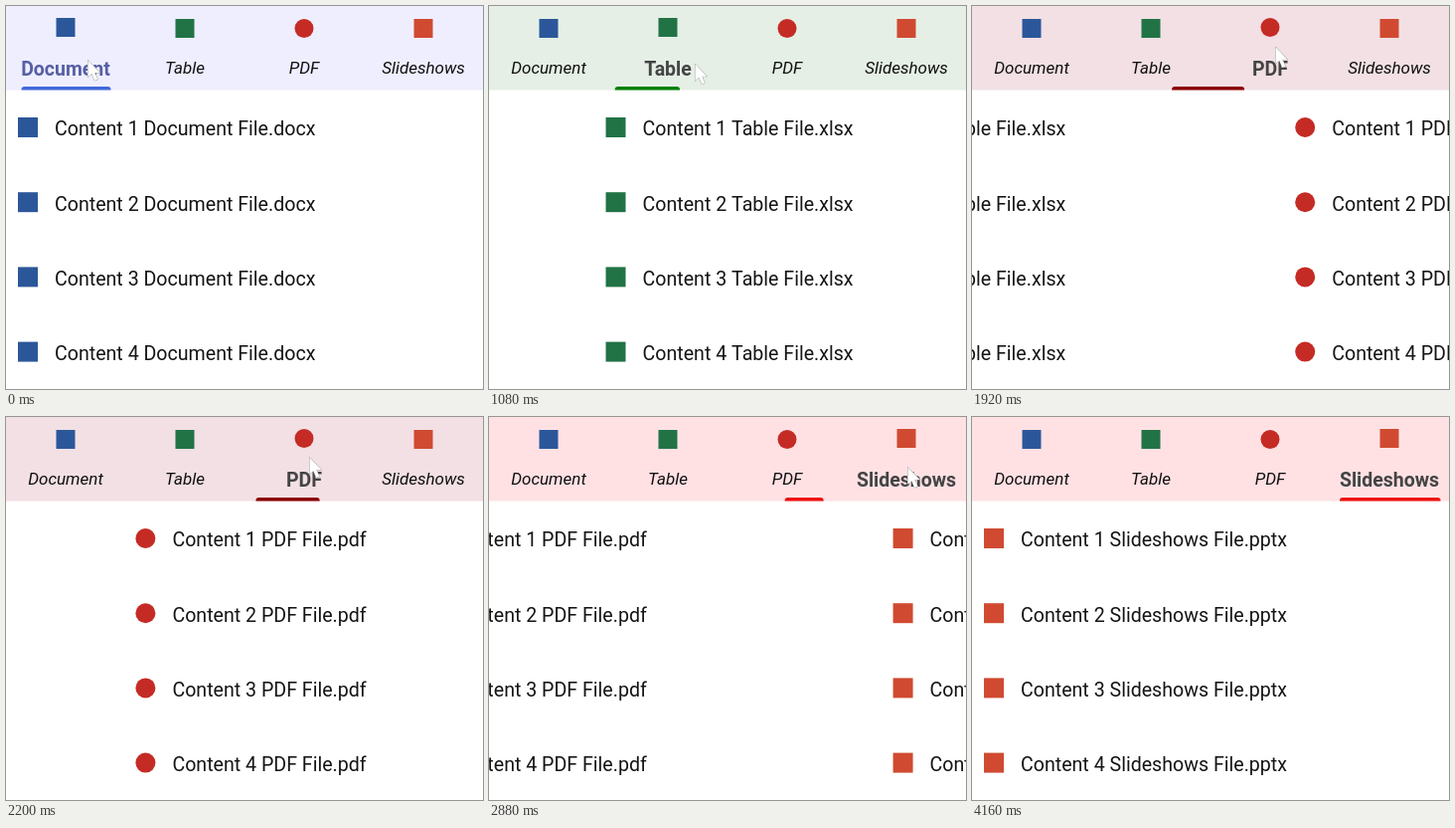
An HTML page with a canvas that plays this animation: 480x385 px, repeating every 4.32 s.

```html
<!DOCTYPE html>
<html lang="en">
<head>
<meta charset="utf-8">
<title>File tabs</title>
<style>
  html, body { margin: 0; height: 100%; overflow: hidden; background: #fff; }
  canvas { display: block; }
</style>
</head>
<body>
<canvas id="stage" width="480" height="385"></canvas>
<script>
const ctx = document.getElementById('stage').getContext('2d');
const LOOP = 4320, SLIDE = 900, WIDTH = 480;
const FONT = 'Roboto, Arial, sans-serif';

// start: when the tab is chosen; stretch: extra bar width while it travels
const tabs = [
  { name: 'Document', ext: 'docx', icon: '#2b579a', head: '#efeeff', bar: '#4169d8', label: '#565fa3', x: 15.5, w: 90, start: -SLIDE },
  { name: 'Table', ext: 'xlsx', icon: '#217346', head: '#e5efe5', bar: '#008000', label: '#444', x: 158, w: 45, start: 603, stretch: 4 },
  { name: 'PDF', ext: 'pdf', icon: '#c52b25', round: true, head: '#f2e0e4', bar: '#8b0000', label: '#444', x: 282, w: 37, start: 1748, stretch: 32 },
  { name: 'Slideshows', ext: 'pptx', icon: '#d04a31', head: '#ffe1e4', bar: '#ee1111', label: '#444', x: 370, w: 101.5, start: 2797, stretch: 0 }
];

// Pointer path: time, x, y
const path = [
  [0, 82, 54], [100, 82, 54], [540, 187, 61], [900, 187, 61], [1520, 284, 45], [1700, 305, 41],
  [2260, 305, 40], [2740, 421, 50], [2900, 421, 50], [3320, 433, 56], [3760, 484, 70]
];

const lerp = (a, b, p) => a + (b - a) * p;

function text(str, x, y, font, color, align = 'left') {
  ctx.font = `${font} ${FONT}`;
  ctx.fillStyle = color;
  ctx.textAlign = align;
  ctx.fillText(str, x, y);
}

function icon(tab, cx, cy, size) {
  ctx.fillStyle = tab.icon;
  ctx.beginPath();
  if (tab.round) ctx.arc(cx, cy, size / 2, 0, Math.PI * 2);
  else ctx.rect(cx - size / 2, cy - size / 2, size, size);
  ctx.fill();
}

function page(tab, left) {
  for (let i = 0; i < 4; i++) {
    const y = 122 + i * 75.2;
    icon(tab, left + 22, y, 20);
    text(`Content ${i + 1} ${tab.name} File.${tab.ext}`, left + 49, y + 8.3, '19.6px', '#151515');
  }
}

function header(active) {
  ctx.fillStyle = tabs[active].head;
  ctx.fillRect(0, 0, WIDTH, 84.5);
  tabs.forEach((tab, i) => {
    const on = i === active, cx = 60 + i * 120;
    icon(tab, cx, on ? 21.5 : 22.5, 19);
    text(tab.name, cx, on ? 69.5 : 68.3, on ? 'bold 19.5px' : 'italic 17px', on ? tab.label : '#111', 'center');
  });
}

function indicator(from, to, p) {
  const x = lerp(from.x, to.x, p);
  const w = lerp(from.w, to.w, p * p) + 4 * p * (1 - p) * (to.stretch || 0);
  ctx.fillStyle = to.bar;
  ctx.beginPath();
  ctx.roundRect(x, 81, w, 3.5, [3, 3, 0, 0]);
  ctx.fill();
}

function pointer(t) {
  const k = path.findIndex(point => point[0] > t);
  if (k < 0) return;
  const [t0, x0, y0] = path[k - 1], [t1, x1, y1] = path[k];
  const u = (t - t0) / (t1 - t0), s = u * u * (3 - 2 * u);
  ctx.save();
  ctx.translate(lerp(x0, x1, s), lerp(y0, y1, s));
  ctx.fillStyle = '#fff';
  ctx.strokeStyle = '#999';
  ctx.stroke(arrow);
  ctx.fill(arrow);
  ctx.restore();
}
const arrow = new Path2D('M.5 .5V17.5L4.3 14L7.3 21L10.3 19.8L7.3 13H12.5Z');

function draw(now) {
  const t = now % LOOP;
  const active = tabs.findLastIndex(tab => t >= tab.start);
  const tab = tabs[active], prev = tabs[Math.max(0, active - 1)];
  const x = Math.min(1, (t - tab.start) / SLIDE);
  const p = 1 - (1 - x) ** 2;

  ctx.fillStyle = '#fff';
  ctx.fillRect(0, 0, WIDTH, 385);
  if (p < 1) page(prev, -WIDTH * p);
  page(tab, WIDTH * (1 - p));
  header(active);
  indicator(prev, tab, p);
  pointer(t);
  requestAnimationFrame(() => draw(performance.now()));
}
draw(performance.now());
</script>
</body>
</html>
```
